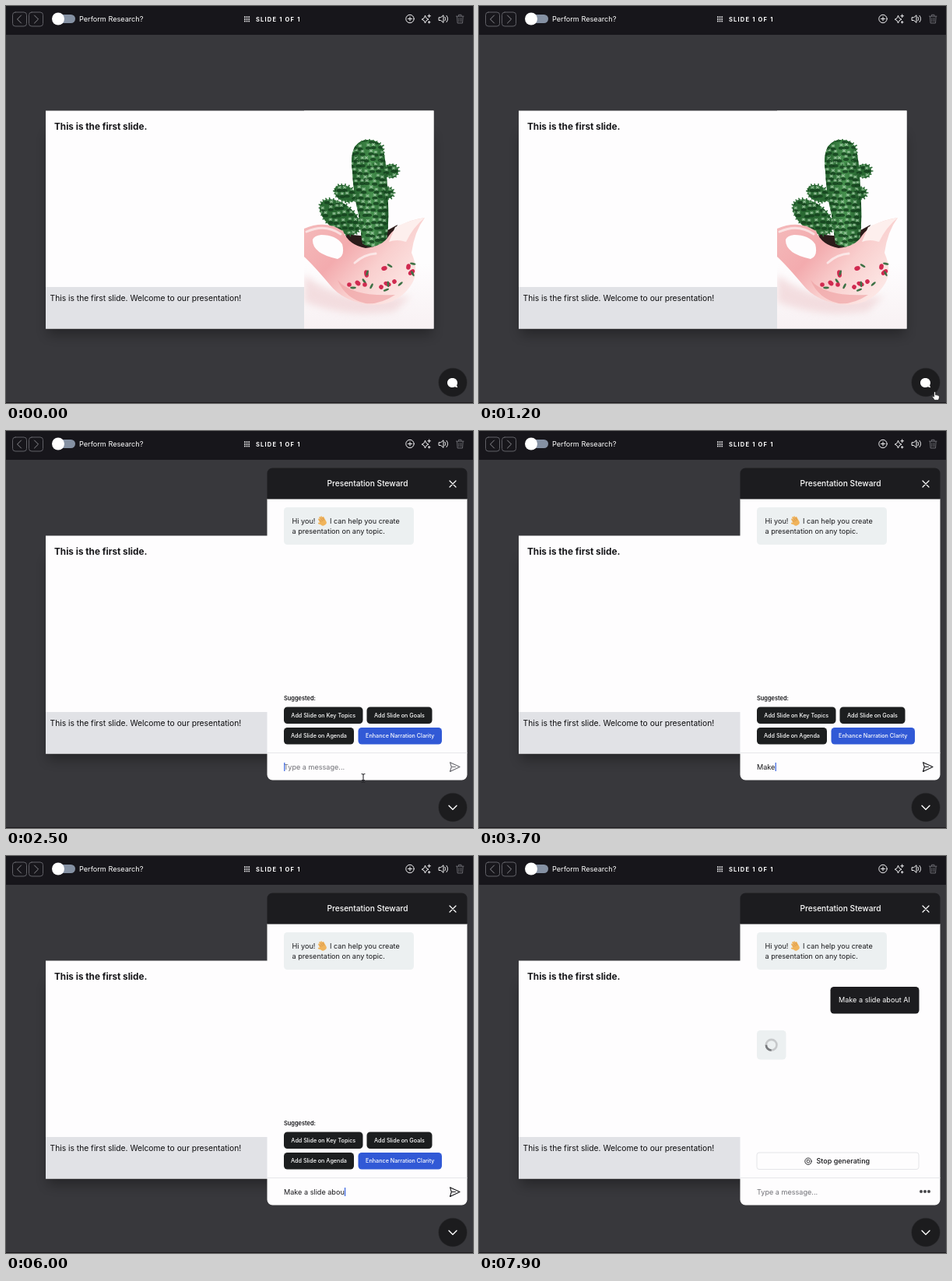
These frames come from a looping animation (600x510 px, 8000 ms). An HTML page:

```html
<!DOCTYPE html>
<html lang="en">
<head>
<meta charset="utf-8">
<title>Slide editor with chat helper</title>
<style>
html, body { margin: 0; width: 100%; height: 100%; overflow: hidden; background: #38383c; }
svg { display: block; width: 600px; height: 510px; }
text { font-family: Inter, "Open Sans", sans-serif; white-space: pre; }
.line { fill: none; stroke-linecap: round; stroke-linejoin: round; }
.chat { font-size: 9.1px; fill: #17171a; }
.chip { font-size: 7.2px; font-weight: 500; fill: #fff; }
</style>
</head>
<body>
<svg viewBox="0 0 600 510">
  <defs>
    <filter id="blur" x="-20%" y="-20%" width="140%" height="140%"><feGaussianBlur stdDeviation="8"/></filter>
    <filter id="soft" x="-20%" y="-40%" width="140%" height="180%"><feGaussianBlur stdDeviation="5"/></filter>
    <clipPath id="photoClip"><rect x="383" y="134.5" width="166.5" height="280"/></clipPath>
    <linearGradient id="pot" x1="0" y1=".1" x2="1" y2=".75">
      <stop offset="0" stop-color="#f4b9ba"/><stop offset=".35" stop-color="#f3abae"/>
      <stop offset=".62" stop-color="#f9cfce"/><stop offset="1" stop-color="#fdecea"/>
    </linearGradient>
    <linearGradient id="stem"><stop offset="0" stop-color="#235f2c"/><stop offset=".55" stop-color="#46914e"/><stop offset="1" stop-color="#1d5627"/></linearGradient>
    <linearGradient id="table" x1="0" y1="0" x2="0" y2="1">
      <stop offset=".7" stop-color="#fefdfe"/><stop offset="1" stop-color="#f8f1f3"/>
    </linearGradient>
    <clipPath id="plantClip">
      <path id="column" d="M448 181Q455 171 467 172Q482 173 485 186Q489 204 490 238Q493 275 489 300Q473 316 458 305Q455 285 453 268Q446 240 445 212Q442 193 448 181Z"/>
      <ellipse cx="436" cy="241" rx="15" ry="10" transform="rotate(25 436 241)"/>
      <ellipse cx="429" cy="271" rx="30" ry="17" transform="rotate(38 429 271)"/>
      <circle cx="495" cy="212" r="9"/><circle cx="491" cy="240" r="7"/>
    </clipPath>
  </defs>

  <rect width="600" height="510" fill="#38383c"/>
  <rect y="509" width="600" height="1" fill="#1c1a1e"/>

  <!-- toolbar -->
  <rect width="600" height="37" fill="#17161b"/>
  <g class="line" stroke="#606066">
    <rect x="8.5" y="8" width="18" height="18" rx="3.5"/><rect x="29.5" y="8" width="18" height="18" rx="3.5"/>
    <path stroke="#8b8b90" d="M19.5 12l-5 5 5 5M36.5 12l5 5-5 5"/>
  </g>
  <rect x="61" y="11" width="28" height="11" rx="5.5" fill="#8591a3"/><circle cx="67" cy="16.5" r="8" fill="#fff"/>
  <text x="94" y="20" font-size="9.15" fill="#fff">Perform Research?</text>
  <g id="grid" fill="#e8e8ea"></g>
  <text x="321" y="19.5" font-size="7.5" font-weight="700" letter-spacing="1.2" fill="#fff">SLIDE 1 OF 1</text>
  <g class="line" stroke="#f2f2f4">
    <circle cx="519" cy="16.5" r="5.2"/><path d="M516.5 16.5h5M519 14v5"/>
    <path d="M538.5 12.5q.6 4 4.5 4.7q-3.9 .7-4.500 4.800q-.6-4.100-4.300-4.800q3.700-.7 4.300-4.700ZM543.700 11v3.600M541.900 12.800h3.600M543.700 19.500v2.600M542.400 20.800h2.600"/>
    <path d="M556.500 14.700h2.200l3.300-2.900v9.600l-3.300-2.900h-2.200ZM564 14.200q1.700 2.300 0 4.600M566 12.400q3.300 4.100 0 8.200"/>
    <path stroke="#68686e" d="M578.500 13.200h9.500M581.500 13v-1.700h3.500v1.700M579.500 13.500l.6 8.500h6.400l.6-8.500M582 15.500v4.500M584.600 15.500v4.500"/>
  </g>

  <!-- slide -->
  <rect x="54" y="166" width="493" height="256" fill="#000" opacity=".32" filter="url(#blur)"/>
  <rect x="51" y="134.5" width="498.5" height="280" fill="#fefdfe"/>
  <rect x="51" y="361" width="332" height="53.5" fill="#e1e2e6"/>
  <text x="62" y="158.500" font-size="11.75" font-weight="700" fill="#17171a">This is the first slide.</text>
  <text x="56.500" y="378.700" font-size="10.28" fill="#0c0c0e">This is the first slide. Welcome to our presentation!</text>
  <g clip-path="url(#photoClip)">
    <rect x="383" y="134" width="167" height="281" fill="url(#table)"/>
    <path d="M383 345Q430 385 520 372L500 392Q440 402 383 380Z" fill="#f0d3d5" opacity=".7" filter="url(#soft)"/>
    <path d="M436 292Q470 302 503 281L490 315H440Z" fill="#2b1b1a"/>
    <g id="plant" clip-path="url(#plantClip)">
      <rect x="395" y="165" width="112" height="150" fill="#2a6a33"/>
      <use href="#column" fill="url(#stem)"/>
    </g>
    <g id="spines" class="line"></g>
    <path fill-rule="evenodd" fill="url(#pot)" d="M383 286Q410 274 433 289Q440 307 462 311Q484 309 492 295Q505 277 538 272Q525 289 521 317Q531 340 522 356Q505 384 472 384Q434 381 416 358Q395 333 383 322ZM394 300Q393 318 426 325Q436 321 432 306Q424 294 405 294Q396 295 394 300Z"/>
    <path d="M500 284Q519 275 538 272Q523 284 514 303Q502 299 492 303Z" fill="#fdefed"/>
    <path d="M426 352Q445 374 500 371Q480 384 462 382Q436 376 426 352Z" fill="#ee9ea1" opacity=".6"/>
    <path class="line" stroke="#fff" stroke-width="3" opacity=".6" d="M386 290Q410 279 430 293M448 330Q460 319 475 318"/>
    <g id="flowers"></g>
  </g>

  <!-- chat window -->
  <g id="panel">
    <path d="M335.500 87H592.500V441.500a7 7 0 0 1-7 7H342.500a7 7 0 0 1-7-7Z" fill="#fefdfe"/>
    <path d="M335.500 87.500V54.500a7 7 0 0 1 7-7H585.500a7 7 0 0 1 7 7V87.500Z" fill="#1c1c1f"/>
    <text x="464.500" y="71" font-size="10.200" font-weight="500" text-anchor="middle" fill="#fff">Presentation Steward</text>
    <path class="line" stroke="#fff" stroke-width="1.200" d="M570 64l8 8M578 64l-8 8"/>
    <rect x="357" y="98" width="167" height="48" rx="4.500" fill="#ecf0f1"/>
    <text class="chat" x="367.500" y="118.700">Hi you!</text>
    <g transform="translate(406.500 115.500) rotate(-28)" fill="#f0b45c">
      <rect x="-4" y="-1" width="8" height="7" rx="3.200"/>
      <g class="line" stroke="#f0b45c" stroke-width="1.900"><path d="M-3 1V-4M-.9 0V-5.500M1.200 0V-5.200M3 1V-3.500M-3 3L-5.500 .5"/></g>
      <path class="line" stroke="#c98034" stroke-width=".5" d="M-2 0V-3M.1 0V-4M2.200 0V-3.500"/>
    </g>
    <text class="chat" x="416" y="118.700">I can help you create</text>
    <text class="chat" x="367.500" y="132.200">a presentation on any topic.</text>

    <g id="suggest">
      <text x="357" y="346" font-size="7.400" font-weight="600" fill="#17171a">Suggested:</text>
    </g>
    <g id="reply">
      <rect x="451.500" y="168" width="114" height="34.500" rx="4.500" fill="#1c1c1f"/>
      <text class="chat" x="462" y="188.300" style="fill:#fff">Make a slide about AI</text>
      <rect x="357" y="224" width="37.500" height="37.500" rx="4.500" fill="#ecf0f1"/>
      <circle class="line" cx="375.700" cy="242.700" r="6.800" stroke="#c6c8ca" stroke-width="2.600"/>
      <path id="arc" class="line" stroke="#77797c" stroke-width="2.600" style="stroke-linecap:butt" d="M375.700 249.500A6.800 6.800 0 0 1 368.900 242.700"/>
      <rect x="357" y="381" width="208" height="21.500" rx="3" fill="#fefdfe" stroke="#e4e5e8"/>
      <circle class="line" cx="423" cy="392.200" r="4.200" stroke="#303034"/>
      <rect x="421.300" y="390.500" width="3.400" height="3.400" rx=".8" class="line" stroke="#303034" stroke-width=".9"/>
      <text x="433.500" y="395.300" font-size="9" font-weight="500" fill="#17171a">Stop generating</text>
      <g fill="#47474b"><circle cx="568" cy="431" r="2"/><circle cx="573" cy="431" r="2"/><circle cx="578" cy="431" r="2"/></g>
    </g>

    <path d="M335.500 413.500H592.500" stroke="#e6e7ea"/>
    <text id="entry" class="chat" x="357" y="434.500"></text>
    <rect id="caret" y="426" width="1.200" height="11" fill="#3561e0"/>
    <path id="send" class="line" stroke-width="1.100" d="M570.500 425.700L583 431.500L570.500 437.500L572.300 431.500ZM572.300 431.500H577.500"/>
  </g>

  <!-- round toggle button -->
  <circle cx="574" cy="483.500" r="18.700" fill="#000" opacity=".2"/>
  <circle cx="574" cy="483.500" r="18" fill="#1c1c1e"/>
  <path id="bubble" fill="#fff" d="M0-6C4-6 6.500-3.300 6.500 0Q6.500 2 5.600 3.300L6.700 6.200L3.200 5.200Q1.800 6 0 6C-4 6-6.500 3.300-6.500 0S-4-6 0-6Z"/>
  <path id="chevron" class="line" stroke="#fff" stroke-width="1.400" d="M-5-2.500L0 2.500L5-2.500"/>

  <g id="cursor" stroke-linejoin="round">
    <path id="hand" fill="#fff" stroke="#111" stroke-width=".7" d="M-1.800-4.200Q-.7-5.600 .2-4V-.6Q1.300-1.500 2 -.2Q3.200-.9 3.700 .3Q5-.1 5 1.300V3L4 6H-1.300Q-2.200 4-4 2Q-4.100 .4-2.500 1.200L-1.800 1.800Z"/>
    <path id="arrow" fill="#111" stroke="#fff" stroke-width=".8" d="M-3-5V5L-.7 2.900L1 6.300L2.500 5.500L1 2.300H4Z"/>
    <path id="beam" class="line" stroke="#26262a" stroke-width="1.100" d="M-2-5.500Q0-5.500 0-4V4Q0 5.500-2 5.500M2-5.500Q0-5.500 0-4M0 4Q0 5.500 2 5.500M-1.500 2.500H1.500"/>
  </g>
</svg>

<script>
const LOOP = 8000, OPEN = 1430, TYPE = 2950, KEY = 170, SENT = 7400;
const PROMPT = 'Make a slide about AI';
const $ = id => document.getElementById(id);

function add(parent, tag, attrs, text) {
  const el = document.createElementNS('http://www.w3.org/2000/svg', tag);
  for (const k in attrs) el.setAttribute(k, attrs[k]);
  if (text) el.textContent = text;
  return parent.appendChild(el);
}

for (let i = 0; i < 9; i++)
  add($('grid'), 'rect', { x: 306 + i % 3 * 2.7, y: 13.3 + Math.floor(i / 3) * 2.7, width: 1.7, height: 1.7 });

[[357, 354.5, 101.5, 'Add Slide on Key Topics'], [463.5, 354.5, 84, 'Add Slide on Goals'],
 [357, 381, 90, 'Add Slide on Agenda'], [452.5, 381, 107.5, 'Enhance Narration Clarity', '#3159d6']
].forEach(([x, y, width, label, fill = '#1c1e1f']) => {
  add($('suggest'), 'rect', { x, y, width, height: 21.5, rx: 4.5, fill });
  add($('suggest'), 'text', { class: 'chip', x: x + width / 2, y: y + 13.3, 'text-anchor': 'middle' }, label);
});

let seed = 7;
const rnd = () => (seed = seed * 16807 % 2147483647) / 2147483647;

// cactus texture: dark hollows and pale tufts on a loose lattice
for (let y = 168; y < 314; y += 8)
  for (let x = 398; x < 506; x += 8) {
    const px = x + (y / 8 % 2) * 4 + rnd() * 4, py = y + rnd() * 4;
    add($('plant'), 'ellipse', { cx: px, cy: py + 4, rx: 3.6, ry: 2, fill: '#123d1b', opacity: .75 });
    add($('plant'), 'ellipse', { cx: px, cy: py, rx: 2.6, ry: 1.8, fill: '#7db784', opacity: .6 });
    const r = .8 + rnd() * 1.2;
    add($('plant'), 'path', { class: 'line', stroke: '#e0f0df', 'stroke-width': .55, opacity: .8,
      d: `M${px - r} ${py - r}l${2 * r} ${2 * r}M${px + r} ${py - r}l${-2 * r} ${2 * r}` });
  }

function fringe(cx, cy, rx, ry, tilt, count) {
  const g = add($('spines'), 'g', { transform: `translate(${cx} ${cy}) rotate(${tilt})` });
  for (let i = 0; i < count; i++) {
    const a = i / count * 2 * Math.PI, c = Math.cos(a), s = Math.sin(a), n = rnd() * 2;
    add(g, 'path', { stroke: '#2a6a33', 'stroke-width': 1.6,
      d: `M${c * (rx - 1)} ${s * (ry - 1)}L${c * (rx + n)} ${s * (ry + n)}` });
  }
}
fringe(467, 188, 19, 16, 0, 24);
fringe(429, 271, 30, 17, 38, 30);
fringe(436, 241, 15, 10, 25, 20);
fringe(495, 212, 9, 9, 0, 14);
fringe(491, 240, 7, 7, 0, 12);

[[441, 358], [452, 356], [463, 344], [482, 361], [486, 337], [490, 357], [499, 354], [517, 335], [521, 342], [461, 358]]
  .forEach(([x, y], i) => {
    add($('flowers'), 'ellipse', { cx: x, cy: y, rx: 2.8 + i % 3, ry: 2.8, fill: '#d02a50', transform: `rotate(${i * 40} ${x} ${y})` });
    add($('flowers'), 'ellipse', { cx: x + 5, cy: y + 4 - i % 2 * 8, rx: 3.8, ry: 1.4, fill: '#3c7145', transform: `rotate(${i * 53} ${x + 5} ${y})` });
  });

const clamp = v => Math.min(1, Math.max(0, v));
const easeOut = v => 1 - (1 - clamp(v)) ** 1.75;
const show = (id, on) => { $(id).style.display = on ? '' : 'none'; };

const path = [[1050, 606, 516], [1300, 576, 492], [1900, 576, 492], [2400, 459, 446], [TYPE + KEY, 459, 446]];
function pointAt(t) {
  const i = path.findIndex(p => p[0] > t);
  if (i < 1) return null;
  const [t0, x0, y0] = path[i - 1], [t1, x1, y1] = path[i];
  let k = (t - t0) / (t1 - t0);
  k = k * k * (3 - 2 * k);
  return [x0 + (x1 - x0) * k, y0 + (y1 - y0) * k];
}

function drawCursor(t) {
  const p = pointAt(t);
  show('cursor', p);
  if (!p) return;
  const [x, y] = p;
  const onButton = Math.hypot(x - 574, y - 486) < 19;
  const onEntry = y < 449 && x < 565;
  show('hand', onButton);
  show('beam', onEntry);
  show('arrow', !onButton && !onEntry);
  $('cursor').setAttribute('transform', `translate(${x} ${y})`);
}

function draw(t) {
  const k = easeOut((t - OPEN) / 200), left = 1 - k;
  const sent = t >= SENT;
  const typed = sent ? 0 : Math.min(PROMPT.length, Math.max(0, Math.floor((t - TYPE) / KEY)));

  show('panel', t >= OPEN);
  $('panel').setAttribute('opacity', easeOut((t - OPEN) / 100));
  $('panel').setAttribute('transform', `translate(592.5 ${448.5 + 13 * left}) scale(${1 - .048 * left}) translate(-592.5 -448.5)`);

  $('bubble').setAttribute('transform', `translate(573.5 484) rotate(${90 * k}) scale(${left})`);
  $('bubble').setAttribute('opacity', 1 - easeOut((t - OPEN) / 100));
  $('chevron').setAttribute('transform', `translate(574 483.8) rotate(${-90 * left}) scale(${k})`);
  $('chevron').setAttribute('opacity', clamp((t - OPEN - 60) / 100));

  show('suggest', !sent);
  show('reply', sent);
  show('send', !sent);
  $('send').setAttribute('stroke', typed ? '#151518' : '#6a6a70');
  $('arc').setAttribute('transform', `rotate(${(t - 7900) * .36} 375.7 242.7)`);

  const entry = $('entry');
  entry.textContent = typed ? PROMPT.slice(0, typed) : 'Type a message...';
  entry.style.fill = typed ? '#17171a' : '#707076';
  $('caret').setAttribute('x', 357.2 + (typed ? entry.getComputedTextLength() : 0));
  // the blink restarts on focus and after the last key
  const lastKey = TYPE + KEY * PROMPT.length;
  const typing = typed > 0 && t < lastKey;
  const idle = t - (typed ? lastKey : OPEN);
  show('caret', !sent && (typing || idle % 1000 < 500));

  drawCursor(t);
}

function frame() {
  draw(performance.now() % LOOP);
  requestAnimationFrame(frame);
}
frame();
</script>
</body>
</html>
```
